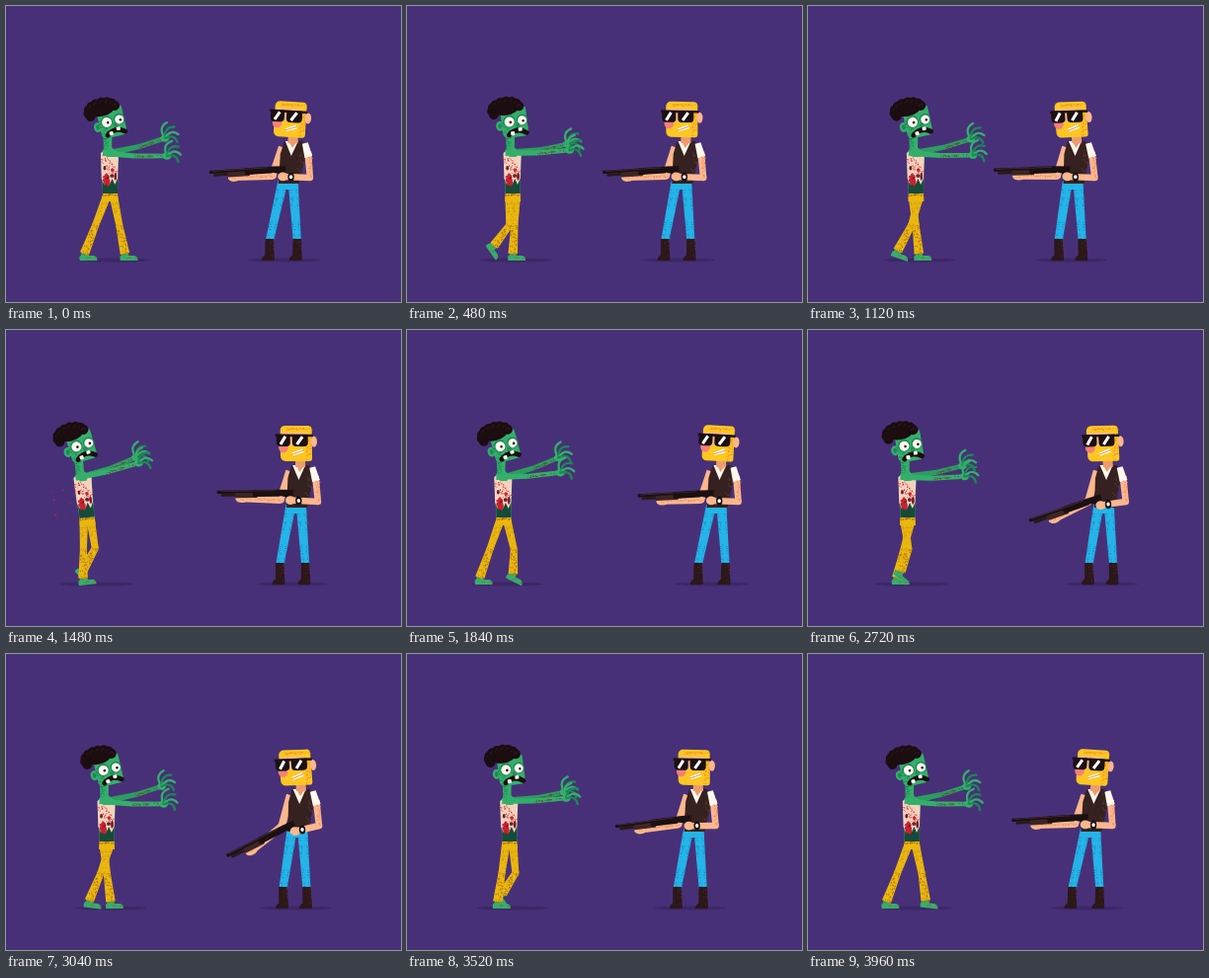
Animation, 400 px wide and 300 px high, one loop 4000 ms. Source, as an HTML page with a canvas:

```html
<!DOCTYPE html>
<html lang="en">
<head>
<meta charset="utf-8">
<title>Standoff</title>
<style>
html, body { margin: 0; width: 100%; height: 100%; overflow: hidden; background: #483078; }
canvas { display: block; width: 100%; height: 100%; }
</style>
</head>
<body>
<canvas id="stage"></canvas>
<script>
const canvas = document.getElementById('stage');
const ctx = canvas.getContext('2d');
const ratio = window.devicePixelRatio || 1;
canvas.width = 400 * ratio;
canvas.height = 300 * ratio;

const LOOP = 4000, SHOT = 1150, SETTLED = 1740;
const NIGHT = '#483078', DARK = '#1b1012', WHITE = '#fff8ee', RED = '#c9222f';
const GREEN = '#34af6b', SHADE = '#1d8656', HAIR = '#1b0d10', YELLOW = '#eab70f';
const SKIN = '#fbb78d', BLUSH = '#e8875c', BLOND = '#fcc721', VEST = '#35211f', JEANS = '#25b4e8', BOOT = '#2c1719';

const mix = (a, b, p) => a + (b - a) * p;
const clamp = p => Math.min(1, Math.max(0, p));
const smooth = p => clamp(p) ** 2 * (3 - 2 * clamp(p));
const pulse = (t, middle, hold, ramp) => smooth((hold + ramp - Math.abs(t - middle)) / ramp);
const between = ([x0, y0], [x1, y1], p) => [mix(x0, x1, p), mix(y0, y1, p)];
const randomizer = seed => () => (seed = (seed * 16807) % 2147483647) / 2147483647;

function fill(color) {
  ctx.fillStyle = color;
  ctx.fill();
}

function poly(color, points) {
  ctx.beginPath();
  points.forEach(([x, y]) => ctx.lineTo(x, y));
  fill(color);
}

function oval(color, x, y, rx, ry = rx, turn = 0) {
  ctx.beginPath();
  ctx.ellipse(x, y, rx, ry, turn, 0, Math.PI * 2);
  fill(color);
}

function box(color, x, y, w, h, r = 0) {
  ctx.beginPath();
  ctx.roundRect(x, y, w, h, r);
  fill(color);
}

function curve(color, width, from, bend, to) {
  ctx.beginPath();
  ctx.moveTo(...from);
  ctx.quadraticCurveTo(...bend, ...to);
  ctx.strokeStyle = color;
  ctx.lineWidth = width;
  ctx.lineCap = 'round';
  ctx.stroke();
}

function limb(color, [x0, y0], [x1, y1], w0, w1 = w0) {
  const len = Math.hypot(x1 - x0, y1 - y0);
  const nx = (y1 - y0) / len / 2, ny = (x0 - x1) / len / 2;
  poly(color, [[x0 + nx * w0, y0 + ny * w0], [x1 + nx * w1, y1 + ny * w1],
    [x1 - nx * w1, y1 - ny * w1], [x0 - nx * w0, y0 - ny * w0]]);
}

function group(x, y, turn, draw) {
  ctx.save();
  ctx.translate(x, y);
  ctx.rotate(turn);
  draw();
  ctx.restore();
}

// Speckles scattered along a line.
function grain(color, from, to, spread, count) {
  const rnd = randomizer(count * 31 + 7);
  ctx.fillStyle = color;
  for (let i = 0; i < count; i++) {
    const [x, y] = between(from, to, rnd()), size = 0.5 + rnd() * 0.7;
    ctx.fillRect(x + (rnd() - 0.5) * spread, y + (rnd() - 0.5) * 2, size, size);
  }
}

// 1 when the two stand closest, 0 after the shot has thrown them apart.
function closeness(t) {
  if (t > SHOT && t < SETTLED) return (SETTLED - t) / (SETTLED - SHOT);
  return ((t - SETTLED + LOOP) % LOOP) / (LOOP - SETTLED + SHOT);
}

const shadow = x => oval('#3b2765', x, 257.5, 37, 2);

function zombieLeg(hip, x, lift) {
  const ankle = [x - lift * 0.9, 251 - lift];
  const knee = [(hip[0] + ankle[0]) / 2 + lift, 222];
  group(...ankle, lift * 0.12, () => {
    limb(GREEN, [0, -2], [0, 4], 6, 8);
    box(GREEN, -5, 2, 18, 5, [2, 6, 1, 1]);
    grain('#8a6a3a', [2, 4], [11, 5], 2, 8);
  });
  limb(YELLOW, hip, knee, 8.5, 7);
  oval(YELLOW, ...knee, 3.5);
  limb(YELLOW, knee, ankle, 7, 9.5);
  grain('#a8690f', knee, ankle, 7, 60);
  grain('#c98a10', hip, knee, 7, 34);
}

function hand(x, y, turn) {
  group(x, y, turn, () => {
    oval(GREEN, 0, 0, 4.5, 3.8);
    for (let i = 0; i < 4; i++) {
      const angle = -1.65 + i * 0.58, reach = 16 - i;
      const point = (r, a) => [r * Math.cos(a), r * Math.sin(a)];
      curve(i % 2 ? SHADE : GREEN, 2.3, [0, 0], point(reach * 0.8, angle - 0.45), point(reach, angle + 0.3));
    }
  });
}

function zombieArm(color, shoulder, wrist, turn) {
  const elbow = between(shoulder, wrist, 0.5);
  elbow[1] += 1.5;
  limb(color, shoulder, elbow, 6, 5);
  limb(color, elbow, wrist, 5, 4.5);
  grain('#6b4030', elbow, wrist, 5, 34);
  hand(...wrist, turn);
}

function zombieHead(tilt) {
  group(105, 117, tilt, () => {
    oval(GREEN, -14, 3, 4, 5);
    oval(SHADE, -14, 3, 1.7, 2.6);
    box(GREEN, -12, -14, 26, 30, [4, 2, 4, 5]);
    grain(SHADE, [-9, -4], [-8, 15], 7, 60);
    oval(HAIR, -6, -14, 13, 7);
    for (let i = 0; i < 9; i++) {
      const a = 2.7 + i * 0.42;
      const x = -6 + 14 * Math.cos(a), y = -13 + 8 * Math.sin(a);
      oval(HAIR, x, y, 5);
      curve('#472629', 0.6, [x - 2, y], [x, y - 3], [x + 2, y]);
    }
    for (const [x, r] of [[-4, 5], [9, 4.5]]) {
      oval(SHADE, x, -0.5, r + 1.2);
      oval(WHITE, x, 0, r);
      oval(DARK, x + 1, 0.5, 1.3);
    }
    oval('#259158', 4, 5, 2.3, 3.2);
    curve(DARK, 5, [-6, 13], [3, 6], [12, 13]);
    box(WHITE, -4, 10, 4, 4, 1);
    box(WHITE, 4, 7, 4, 3.5, 1);
  });
}

function zombieTorso() {
  limb(GREEN, [102, 129], [102, 148], 9, 8);
  poly(GREEN, [[99, 143], [106, 143], [113, 150], [112, 190], [97, 190], [95, 150]]);
  limb('#164a3b', [104.5, 174], [104.5, 190], 15);
  const hem = Array.from({ length: 7 }, (_, i) => [112 - i * 2.7, i % 2 ? 181 : 175]);
  poly('#f4d3bd', [[95, 149], [98, 147], [101, 153], [108, 153], [110, 147], [113, 150], ...hem]);
  const rnd = randomizer(77);
  for (let i = 0; i < 13; i++) {
    oval(i % 4 ? RED : '#641a2a', 99 + rnd() * 11, 162 + rnd() * 17, 1 + rnd() * 2, 1.5 + rnd() * 2.5);
  }
  grain(RED, [98, 154], [110, 172], 10, 46);
  grain(SHADE, [100, 133], [100, 148], 5, 28);
}

function zombie(t) {
  const step = Math.cos(Math.PI * t / 1000), swing = Math.sin(Math.PI * t / 1000);
  const reach = Math.cos(Math.PI * t / 500);
  const spread = (reach + 1) / 2;
  const thrown = clamp((t - SHOT) / (SETTLED - SHOT));
  const hit = Math.sin(Math.PI * Math.sqrt(thrown));
  const raise = 6 * pulse(t, 1700, 150, 400);
  const x = mix(-7, 5, closeness(t)) - hit * 20;
  shadow(108 + x);

  group(100 + x, 256, -0.14 * hit, () => {
    ctx.translate(-100, -256);
    zombieLeg([108, 193], 103.5 + 16 * step, Math.max(0, -swing) * 8);
    zombieLeg([101, 193], 93.5 - 15 * step, Math.max(0, swing) * 8);
    limb(YELLOW, [104.5, 188], [104.5, 198], 15, 16);
    grain('#a8690f', [98, 191], [111, 191], 3, 26);
    zombieArm('#2b9d60', [108, 148], [160, 140 - 6 * spread - raise], -0.1 * spread);
    zombieTorso();
    zombieArm(GREEN, [97, 149], [162, 146 + 6 * spread - raise], 0.1);
    zombieHead(-0.18 - 0.05 * reach - raise * 0.01);
  });

  const splash = (t - SHOT - 30) / 330;
  if (splash > 0 && splash < 1) {
    const rnd = randomizer(97);
    for (let i = 0; i < 12; i++) {
      const distance = 20 + rnd() * 42, fall = (rnd() - 0.5) * 36;
      oval(RED, 92 - distance * Math.sqrt(splash), 164 + fall * splash + 14 * splash ** 2, (0.8 + rnd() * 1.8) * (1 - splash * 0.7));
    }
  }
}

function hunterLeg(hip, ankle) {
  const [x, y] = ankle;
  limb(JEANS, hip, ankle, 10, 8);
  for (const side of [-3.5, 3.5]) {
    grain('#1583bd', [hip[0] + side, hip[1]], [x + side * 0.8, y], 3, 44);
  }
  limb(BOOT, [x, y - 2], [x, 257], 8.5, 9.5);
  box(BOOT, x - 8, 252.5, 12.5, 5.5, [5, 0, 0, 0]);
  grain('#573038', [x + 2, 238], [x + 1, 256], 5, 18);
}

function hunterHead(tilt) {
  group(288, 131, tilt, () => {
    limb('#ee9b6f', [2, -4], [2, 8], 10);
    box(BLOND, -18, -34, 32, 36, [5, 4, 3, 5]);
    box(SKIN, -17, -27, 25, 13);
    grain('#f08d2a', [-12, -31], [12, -31], 4, 36);
    grain('#f08d2a', [11, -22], [9, 0], 5, 46);
    oval(SKIN, 16, -18, 3.2, 5.5);
    oval('#f58079', -15, -12, 4.8, 5.5);
    limb(WHITE, [-6, -5], [5, -9], 3, 4);
    curve('#b0592e', 0.6, [-6, -5], [0, -7], [5, -9]);
    limb(DARK, [-23, -24], [15, -24], 2.5);
    for (const [x, w] of [[-22, 14], [-6, 16]]) {
      box(DARK, x, -25, w, 12, [0, 0, 4, 4]);
      limb('#fff', [x + w * 0.65, -23], [x + w * 0.3, -15], 3);
    }
  });
}

function shotgun() {
  box(DARK, -73, -2.6, 50, 3.4, 1);
  box('#2a191b', -69, 0.6, 42, 3, 1);
  box('#3d2526', -55, 0.2, 23, 5, 1.5);
  box(DARK, -37, -3, 28, 7, 1.5);
  limb(DARK, [-10, 0], [4, 2], 6, 9);
  limb('#4a3033', [-70, -1.8], [-14, -2], 0.7);
}

function muzzleFlash(age) {
  if (age <= 0 || age >= 1) return;
  for (const turn of [-0.7, 0, 0.7]) {
    limb('#ffd34a', [-73, 0], [-73 - 18 * Math.cos(turn), 14 * Math.sin(turn)], 5, 5 * (1 - age));
  }
  oval('#fff8dd', -77, 0, 5, 2.4);
}

function hunter(t) {
  const sway = Math.cos(Math.PI * t / 1000);
  const x = mix(310, 266, closeness(t));
  const lower = pulse(t, 3030, 120, 500);
  const kick = t > SHOT ? Math.exp((SHOT - t) / 170) : 0;
  const gunTurn = -0.06 - 0.4 * lower + 0.26 * kick + 0.03 * pulse(t, SHOT, 50, 500);
  const gunX = 278, gunY = 165 + lower * 8 - kick * 3;
  const onGun = (px, py) => [
    gunX + px * Math.cos(gunTurn) - py * Math.sin(gunTurn),
    gunY + px * Math.sin(gunTurn) + py * Math.cos(gunTurn)];
  shadow(x);

  ctx.save();
  ctx.translate(x - 280, 0);
  // Shift the weight by leaning everything above the soles.
  const lean = 0.019 * (sway - 1);
  ctx.transform(1, 0, -lean, 1, lean * 258, 0);

  hunterLeg([290, 180], [294 - (1 - sway), 238]);
  hunterLeg([279, 180], [266 + (1 - sway), 238]);
  limb(JEANS, [284.5, 177], [284.5, 186], 20, 21);

  const farElbow = [269, 172 + lower * 3], farHand = onGun(-48, 6);
  limb(SKIN, [279, 143], farElbow, 8, 7.5);
  poly(VEST, [[281, 137], [299, 137], [304, 145], [296, 180], [275, 180], [277, 150]]);
  grain('#5a3a35', [300, 144], [294, 178], 6, 36);
  poly(WHITE, [[282, 137], [295, 137], [288, 152]]);
  poly('#ee9b6f', [[285, 136], [295, 136], [289, 144]]);
  hunterHead(0.01 + 0.05 * sway);

  limb(SKIN, farElbow, farHand, 8, 6.5);
  oval(SKIN, ...farElbow, 3.8);
  oval(SKIN, ...farHand, 6.5, 4, gunTurn);
  grain(BLUSH, farElbow, farHand, 6, 34);
  group(gunX, gunY, gunTurn, () => {
    shotgun();
    muzzleFlash((t - SHOT) / 110);
  });

  const nearElbow = [307, 174], nearHand = onGun(1, 8);
  limb(SKIN, [305, 148], nearElbow, 7, 6.5);
  oval(SKIN, ...nearElbow, 3.3);
  limb(SKIN, nearElbow, nearHand, 6.5);
  oval(SKIN, ...nearHand, 5, 4.4);
  limb(WHITE, [302, 139], [305.5, 153], 6, 8);
  grain(BLUSH, [307, 153], nearElbow, 4, 26);
  const wrist = between(nearElbow, nearHand, 0.7);
  oval(DARK, ...wrist, 3.2, 4.6);
  oval('#fff', ...wrist, 1.7, 2);
  ctx.restore();
}

function render(t) {
  ctx.setTransform(ratio, 0, 0, ratio, 0, 0);
  ctx.fillStyle = NIGHT;
  ctx.fillRect(0, 0, 400, 300);
  zombie(t);
  hunter(t);
}

let start;
function tick(now) {
  start ??= now;
  render((now - start) % LOOP);
  requestAnimationFrame(tick);
}
render(0);
requestAnimationFrame(tick);
</script>
</body>
</html>
```
